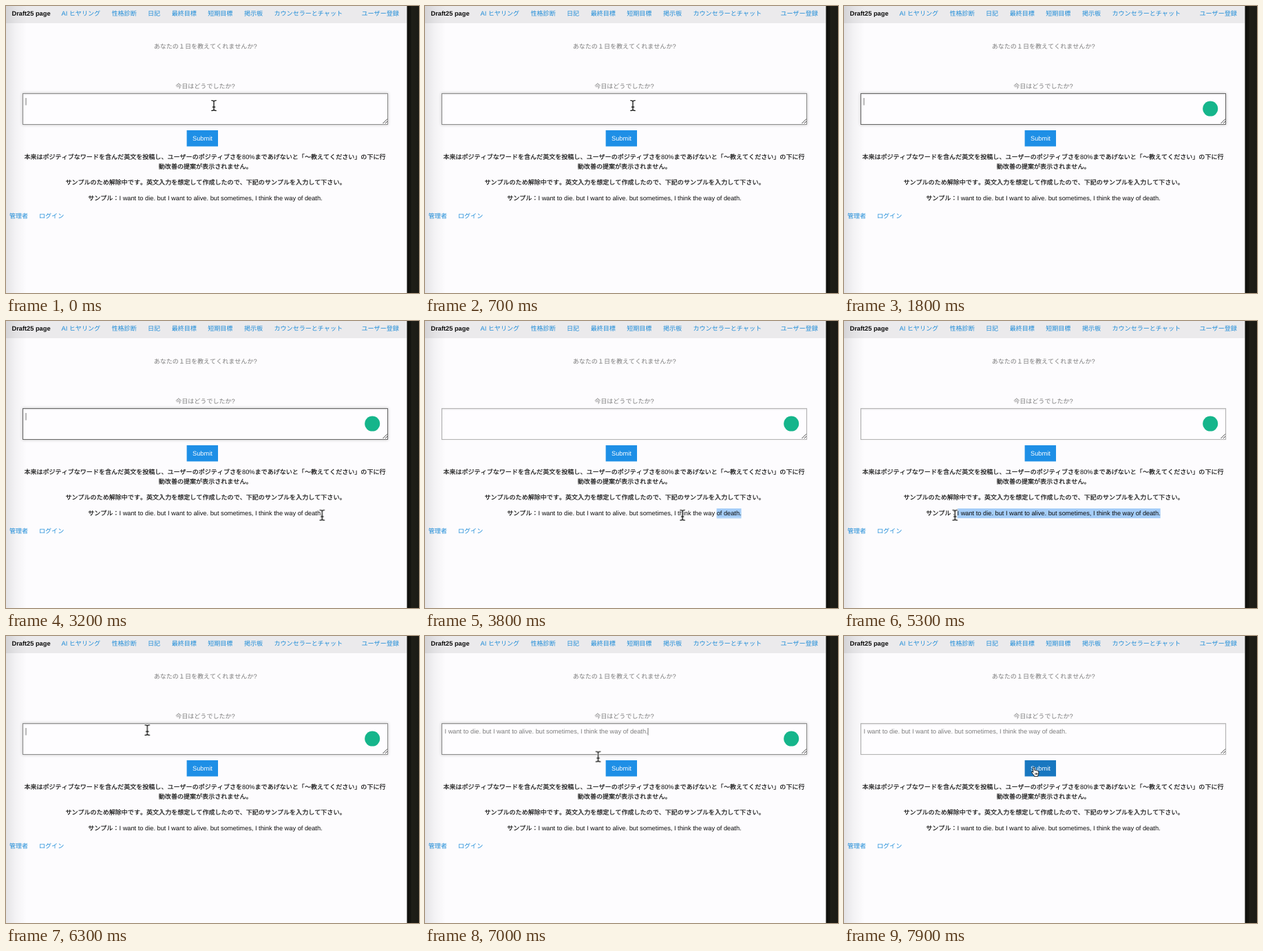
These frames come from a looping animation (600 by 418 pixels, 8 s). An HTML page:

```html
<!DOCTYPE html>
<html lang="ja">
<head>
<meta charset="utf-8">
<title>Draft25 page</title>
<style>
  html, body { margin: 0; width: 100%; height: 100%; overflow: hidden; background: #fdfcfe; }
  .stage { position: relative; width: 600px; height: 418px; overflow: hidden; }
  .stage > * { position: absolute; }
  .nav { left: 0; top: 0; width: 583px; height: 25px; background: #ebeaec; }
  .shade { left: 0; top: 0; width: 30px; height: 418px;
    background: linear-gradient(90deg, rgba(60,60,65,.13), rgba(60,60,65,.05) 45%, transparent); }
  .edge { left: 582px; top: 0; width: 18px; height: 418px;
    background: linear-gradient(90deg, #7f7f7c 1px, #10100d 1px, #15150f 6px, #1f1e17 7px, #1c1b15); }
  .field { left: 24px; top: 127px; width: 531px; height: 46px; box-sizing: border-box;
    border: 1px solid; background: #fefdff; animation: field 8s linear infinite; }
  svg { left: 0; top: 0; }

  text { font: 9.05px "Liberation Sans", "Noto Sans CJK JP", "Noto Sans CJK", sans-serif;
    font-kerning: none; text-rendering: geometricPrecision; fill: #0c0c0c; white-space: pre; }
  .en { font-size: 9.25px; }
  .bold { font-weight: 700; }
  .link text { fill: #1e8cd8; }
  .soft text, .typed { fill: #7c7c7c; }
  .body text { stroke: #0c0c0c; stroke-width: .18; }
  .body .en { stroke: none; }

  .button { fill: #1e8fe6; animation: hover 8s linear infinite; }
  .badge { fill: #15b58b; animation: badge 8s linear infinite; }
  .mark { fill: #a5cdf8; transform-box: fill-box; transform-origin: 100% 50%;
    animation: select 8s linear infinite; }
  .caret { fill: #777; animation: caret 8s step-end infinite; }
  .typed { animation: paste 8s step-end infinite; }
  .pointer { animation: move 8s linear infinite; }
  .beam { fill: none; stroke-linecap: round; animation: beam 8s step-end infinite; }
  .hand { fill: #fff; stroke: #111; stroke-width: .9; stroke-linejoin: round;
    animation: hand 8s step-end infinite; }

  @keyframes field {
    0%, 11.25% { border-color: #8d8d8d; box-shadow: 0 0 4px #bbb, inset 0 1px 2px #0a0a0a1a; }
    15%, 42.3% { border-color: #666; box-shadow: 0 0 4px #bbb, inset 0 1px 2px #0a0a0a1a; }
    46.5%, 74.4% { border-color: #b4b4b4; box-shadow: 0 0 1px #ccc, inset 0 1px 2px #0a0a0a1a; }
    78%, 91.9% { border-color: #8d8d8d; box-shadow: 0 0 4px #bbb, inset 0 1px 2px #0a0a0a1a; }
    96%, 100% { border-color: #b4b4b4; box-shadow: 0 0 1px #ccc, inset 0 1px 2px #0a0a0a1a; }
  }
  @keyframes hover {
    0%, 88.75% { fill: #1e8fe6; }
    92%, 100% { fill: #1877c0; }
  }
  @keyframes badge {
    0%, 11.25% { opacity: 0; }
    15%, 91.9% { opacity: 1; }
    94%, 100% { opacity: 0; }
  }
  @keyframes select {
    0%, 45% { transform: scaleX(0); animation-timing-function: steps(9); }
    47.5% { transform: scaleX(.122); animation-timing-function: steps(13); }
    50% { transform: scaleX(.29); animation-timing-function: steps(33); }
    57.5% { transform: scaleX(.69); animation-timing-function: steps(25); }
    65.6%, 74.39% { transform: scaleX(1); animation-timing-function: step-end; }
    74.4%, 100% { transform: scaleX(0); }
  }
  @keyframes caret {
    0%, 9.375%, 21.875%, 34.375%, 74.4% { opacity: 1; transform: none; }
    3.75%, 16.25%, 28.75%, 41.25%, 80.6% { opacity: 0; transform: none; }
    83.1% { opacity: 1; transform: translateX(295px); }
    89.4%, 100% { opacity: 0; transform: translateX(295px); }
  }
  @keyframes paste {
    0% { opacity: 0; }
    83.1%, 100% { opacity: 1; }
  }
  @keyframes move {
    0%, 31.25% { transform: translate(302px, 145px); animation-timing-function: ease-in-out; }
    39.4%, 42.5% { transform: translate(459.3px, 282.7px); }
    47.5% { transform: translate(374.3px, 282.7px); }
    55% { transform: translate(255px, 282.7px); }
    64%, 68% { transform: translate(161.3px, 282.7px); animation-timing-function: ease-in-out; }
    74%, 84% { transform: translate(205.3px, 137px); animation-timing-function: ease-in-out; }
    90%, 100% { transform: translate(277px, 197px); }
  }
  @keyframes beam {
    0%, 31.25% { opacity: 1; }
    11.25%, 88.75%, 100% { opacity: 0; }
  }
  @keyframes hand {
    0% { opacity: 0; }
    88.75%, 100% { opacity: 1; }
  }
</style>
</head>
<body>
<div class="stage">
  <div class="nav"></div>
  <div class="field"></div>
  <div class="shade"></div>
  <div class="edge"></div>
  <svg width="600" height="418" viewBox="0 0 600 418">
    <defs>
      <path id="bar" d="M-3.2-7.4Q-.4-7.4 0-5.8Q.4-7.4 3.2-7.4M-3.2 7.4Q-.4 7.4 0 5.8Q.4 7.4 3.2 7.4M0-5.8V5.8M-1.8 2.1H1.8"/>
    </defs>
    <text class="en bold" x="8.5" y="14.4">Draft25 page</text>
    <g class="link">
      <text x="80.5" y="14"><tspan class="en">AI </tspan>ヒヤリング</text>
      <text x="153.5" y="14">性格診断</text>
      <text x="206" y="14">日記</text>
      <text x="240.7" y="14">最終目標</text>
      <text x="293.2" y="14">短期目標</text>
      <text x="346" y="14">掲示板</text>
      <text x="389.5" y="14">カウンセラーとチャット</text>
      <text x="516.5" y="14">ユーザー登録</text>
      <text x="5" y="308.5">管理者</text>
      <text x="48" y="308.5">ログイン</text>
    </g>
    <g class="soft">
      <text x="214.7" y="62">あなたの１日を教えてくれませんか<tspan class="en">?</tspan></text>
      <text x="246.2" y="120">今日はどうでしたか<tspan class="en">?</tspan></text>
    </g>

    <path d="M547.5 171l6.5-6.5M551 171l3-3" stroke="#444" fill="none"/>
    <text class="en typed" x="28.5" y="142.3">I want to die. but I want to alive. but sometimes, I think the way of death.</text>
    <rect class="caret" x="28.5" y="134" width="1" height="10.5"/>
    <circle class="badge" cx="532.2" cy="149.6" r="11"/>

    <rect class="button" x="262.6" y="181" width="45.4" height="23.5"/>
    <text class="en" x="271" y="195.8" style="fill:#fefefe">Submit</text>

    <rect class="mark" x="164.5" y="273" width="295.2" height="14.2"/>
    <g class="body">
      <text x="26.4" y="223">本来はポジティブなワードを含んだ英文を投稿し、ユーザーのポジティブさを<tspan class="en">80%</tspan>まであげないと「～教えてください」の下に行</text>
      <text x="221.8" y="237.4">動改善の提案が表示されません。</text>
      <text x="86.4" y="260.4">サンプルのため解除中です。英文入力を想定して作成したので、下記のサンプルを入力して下さい。</text>
      <text x="119.2" y="283.3">サンプル：</text>
      <text class="en" x="164.5" y="283.3">I want to die. but I want to alive. but sometimes, I think the way of death.</text>
    </g>

    <g class="pointer">
      <g class="beam">
        <use href="#bar" stroke="#fff" stroke-width="3"/>
        <use href="#bar" stroke="#111" stroke-width="1.3"/>
      </g>
      <path class="hand" d="M-2.2 1.6V-4.6Q-2.2-5.8-1.1-5.8T0-4.6V-1.2Q1-2 2-.9Q3.2-1.6 4-.4Q5.6-.7 5.8 1V3Q5.8 4.6 4.8 6V7.4H-.8V6.2L-4.2 2Q-4.8.7-3.8.4Q-3 .3-2.2 1.6ZM.9 2.4V5M2.5 2.4V5M4 2.4V5"/>
    </g>
  </svg>
</div>
</body>
</html>
```
